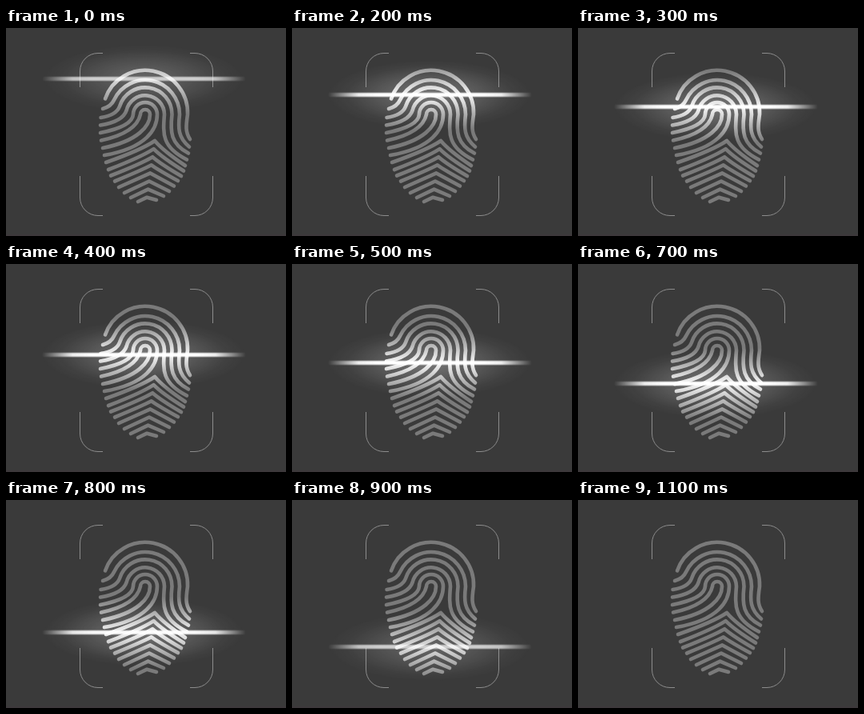
An HTML page for the animation above (1600 ms loop, 350 by 260 pixels).

```html
<!DOCTYPE html>
<html lang="en">
<head>
<meta charset="utf-8">
<title>Fingerprint scan</title>
<style>
  html, body { margin: 0; width: 100%; height: 100%; overflow: hidden; background: #3a3a3a; }
  svg { display: block; width: 350px; height: 260px; }
  .line { fill: none; stroke-linecap: round; }
  .frame { stroke: #8c8c8c; stroke-width: 1; stroke-linecap: butt; }
  #ridges { stroke-width: 4.6; stroke-linejoin: round; }
  .scan { animation: scan 1600ms step-end infinite; }
  @keyframes scan {
    0%     { transform: translateY(63.5px);  opacity: .75; }
    6.25%  { transform: translateY(73.5px);  opacity: .9; }
    12.5%  { transform: translateY(83.5px);  opacity: 1; }
    18.75% { transform: translateY(98.5px);  opacity: 1; }
    25%    { transform: translateY(113.5px); opacity: 1; }
    31.25% { transform: translateY(123.5px); opacity: 1; }
    37.5%  { transform: translateY(133.5px); opacity: 1; }
    43.75% { transform: translateY(149.5px); opacity: 1; }
    50%    { transform: translateY(165.5px); opacity: .97; }
    56.25% { transform: translateY(183.5px); opacity: .75; }
    62.5%  { transform: translateY(193.5px); opacity: .35; }
    68.75%, 100% { transform: translateY(193.5px); opacity: 0; }
  }
</style>
</head>
<body>
<svg viewBox="0 0 350 260">
  <defs>
    <g id="ridges" class="line">
      <path d="M124 88.4A53 53 0 0 1 227 108C225 122 224 130 230 139"/>
      <path d="M121 101Q131.5 98 135 90A43 43 0 0 1 217 108C215 125 215 137 229 148.5"/>
      <path d="M118.5 112Q138 109 142 98A33.5 33.5 0 0 1 207.5 108C205 130 206 145 228 156.5"/>
      <path d="M118 121.5Q146 117 150.6 103A24 24 0 0 1 198 108C196 133 195 149 226 164.5"/>
      <path d="M118 131Q158 123 159 108A15 15 0 0 1 189 108C189 126 176 150 123 159"/>
      <path d="M119 140.5Q163 131 168 108A6 6 0 0 1 180 108C180 122 166 141 121 150"/>
      <path id="chevrons"/>
    </g>
    <linearGradient id="beam">
      <stop offset="0" stop-color="#fff" stop-opacity="0"/>
      <stop offset=".15" stop-color="#fff" stop-opacity=".9"/>
      <stop offset=".25" stop-color="#fff"/>
      <stop offset=".75" stop-color="#fff"/>
      <stop offset=".85" stop-color="#fff" stop-opacity=".9"/>
      <stop offset="1" stop-color="#fff" stop-opacity="0"/>
    </linearGradient>
    <radialGradient id="glow">
      <stop offset="0" stop-color="#fff" stop-opacity=".32"/>
      <stop offset=".5" stop-color="#fff" stop-opacity=".15"/>
      <stop offset=".8" stop-color="#fff" stop-opacity=".04"/>
      <stop offset="1" stop-color="#fff" stop-opacity="0"/>
    </radialGradient>
    <linearGradient id="band" x2="0" y2="1">
      <stop offset="0" stop-color="#fff" stop-opacity="0"/>
      <stop offset=".27" stop-color="#fff" stop-opacity=".4"/>
      <stop offset=".5" stop-color="#fff" stop-opacity=".9"/>
      <stop offset=".73" stop-color="#fff" stop-opacity=".4"/>
      <stop offset="1" stop-color="#fff" stop-opacity="0"/>
    </linearGradient>
    <mask id="lit" maskUnits="userSpaceOnUse" x="0" y="0" width="350" height="260">
      <rect class="scan" x="100" y="-45" width="150" height="90" fill="url(#band)"/>
    </mask>
  </defs>

  <rect width="350" height="260" fill="#3a3a3a"/>
  <rect y="258" width="350" height="2" fill="#3d383b"/>
  <path class="line frame" d="M92.5 74V54A22.5 22.5 0 0 1 115 31.5H121
    M230 31.5H236A22.5 22.5 0 0 1 258.5 54V74
    M258.5 185V212A22.5 22.5 0 0 1 236 234.5H230
    M121 234.5H115A22.5 22.5 0 0 1 92.5 212V185"/>
  <use href="#ridges" stroke="#7a7a7a"/>
  <g class="scan">
    <ellipse cx="172" cy="0" rx="128" ry="44" fill="url(#glow)"/>
    <rect x="45" y="-2.5" width="255" height="5" fill="url(#beam)"/>
  </g>
  <g mask="url(#lit)"><use href="#ridges" stroke="#fff"/></g>
</svg>
<script>
  // Left and right ends of each chevron, top to bottom.
  const ends = [
    [125, 168, 224, 172], [128, 177, 222, 178.5], [131, 184.5, 219, 185], [136, 191.5, 215, 191],
    [141, 199, 210, 197.5], [148, 206, 204, 204], [156, 212, 197, 210], [165, 217, 188, 215]
  ];
  const chevron = ([lx, ly, rx, ry], i) => {
    const ax = 186 - 1.4 * i, ay = 141 + 10.1 * i;
    const sag = Math.max(0, 4 - i);
    const bend = (x, y) => `${ax + (x - ax) * .28} ${ay + (y - ay) * .28 + sag}`;
    return `M${lx} ${ly}Q${bend(lx, ly)} ${ax} ${ay}Q${bend(rx, ry)} ${rx} ${ry}`;
  };
  document.getElementById('chevrons').setAttribute('d', ends.map(chevron).join(''));
</script>
</body>
</html>
```
